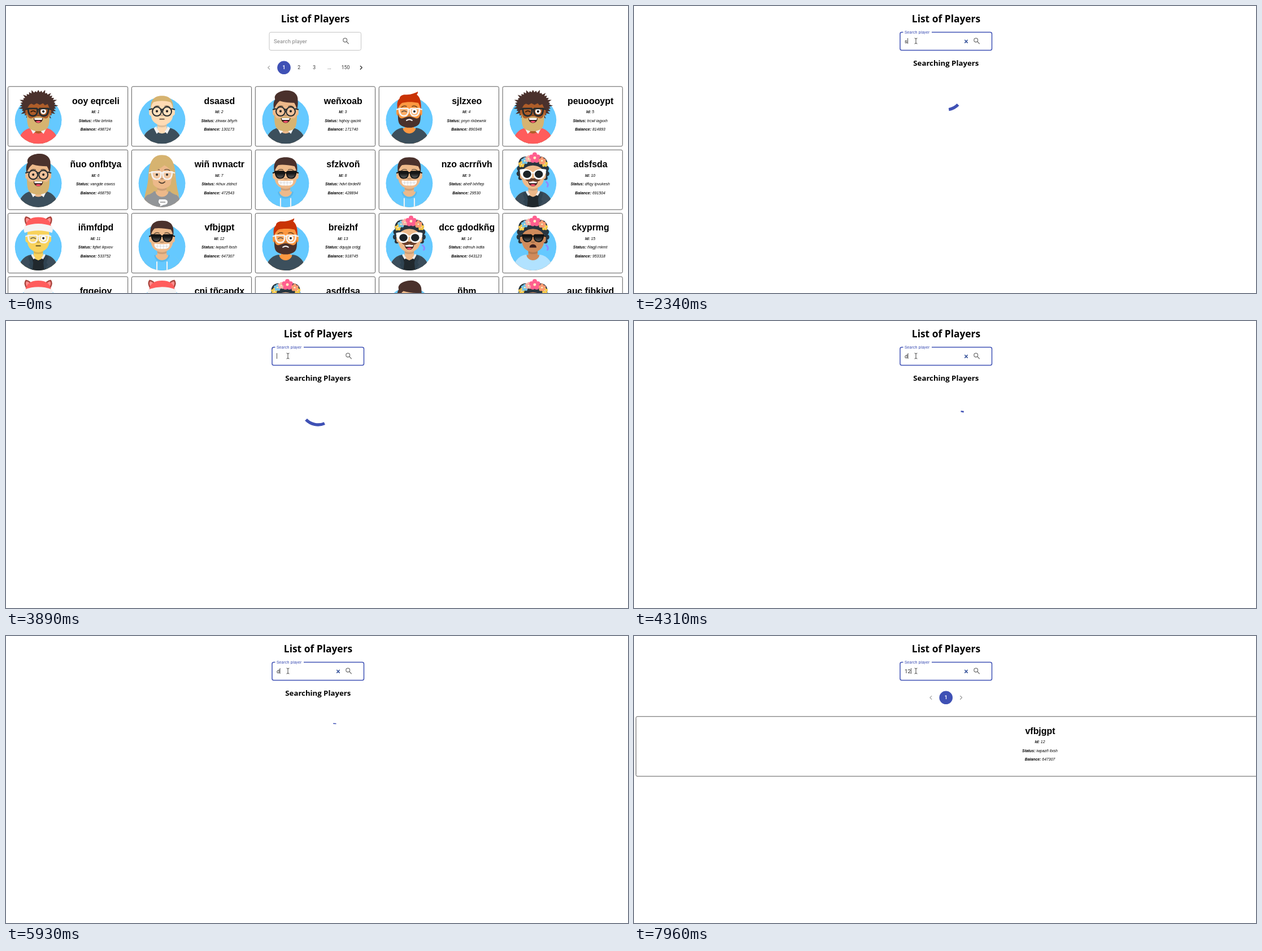
An HTML page that plays this animation: 1101x509 px, repeating every 8000 ms.

```html
<!DOCTYPE html>
<html lang="en">
<head>
<meta charset="utf-8">
<title>List of Players</title>
<style>
html, body { margin: 0; width: 100%; height: 100%; overflow: hidden; background: #fff; }
svg { display: block; }
text { text-anchor: middle; }
.head { font-family: "Open Sans", sans-serif; font-weight: 700; }
.name { font: 700 15.9px "Liberation Sans", Arial, sans-serif; }
.info { font: italic 6.9px "Liberation Sans", Arial, sans-serif; }
.info tspan { font-weight: 700; }
.ui { font-family: Roboto, sans-serif; letter-spacing: .00938em; }
.left { text-anchor: start; }
</style>
</head>
<body>
<svg id="stage" width="1101" height="509" viewBox="0 0 1101 509"></svg>
<script>
const LOOP = 8000, BLUE = '#3f51b5', DARK = '#252c2f', BROWN = '#4a312c', BLOND = '#d6b370';

// ---- shape helpers
const fill = (color, d) => `<path fill="${color}" d="${d}"/>`;
const line = (color, width, d) =>
  `<path fill="none" stroke="${color}" stroke-width="${width}" stroke-linecap="round" stroke-linejoin="round" d="${d}"/>`;
const dot = (color, x, y, r) => `<circle fill="${color}" cx="${x}" cy="${y}" r="${r}"/>`;
const mirror = s => s + `<g transform="translate(264) scale(-1 1)">${s}</g>`;

// ---- avatar parts, drawn in a 264 x 280 box
const body = skin => fill(skin, 'M156 180v20h4a72 72 0 0 1 72 72v8H32v-8a72 72 0 0 1 72-72h4v-20A56 56 0 0 1 76 136a12 12 0 0 1-10-12v-14a12 12 0 0 1 10-12v-6a56 56 0 0 1 112 0v6a12 12 0 0 1 10 12v14a12 12 0 0 1-10 12A56 56 0 0 1 156 180z')
  + fill('#0002', 'M108 180a56 56 0 0 0 48 0v10a56 56 0 0 1-48 0z');
const shirt = color => fill(color, 'M165 198C201 200 232 234 232 272v8H32v-8C32 234 63 200 99 198c0 16 15 29 33 29s33-13 33-29z');
const collar = mirror(fill('#f2f2f2', 'M104 190l-14 9 15 30 14-13c-9-6-14-15-15-26z'));
const cloth = {
  sweater: color => shirt(color) + collar,
  blazer: shirt('#3a4c5a') + fill('#20282d', 'M100 212L92 280h80l-8-68-32 16z')
    + mirror(fill('#2f4351', 'M96 199l-16 12 10 30-8 8 20 31 4-40z')) + mirror(fill('#eee', 'M103 194l-8 6 12 22 10-6z')),
  hoodie: shirt('#65c9ff') + mirror(fill('#5ab9eb', 'M92 202c4 20 16 32 40 34v-9c-18 0-33-13-33-29z') + line('#f4f4f4', 6, 'M106 236v44')),
  tee: shirt('#929598') + fill('#fff', 'M118 240h30q16 4 12 18-4 10-20 10l-18 8 2-10q-16-12-6-26z') + line('#777', 4, 'M124 254h24'),
};
const nose = fill('#0003', 'M120 130a12 8 0 0 0 24 0z');
const brow = mirror(line('#0009', 4, 'M92 92q12-10 26-4'));
const eye = mirror(dot('#000', 106, 113, 6));
const wink = line('#000a', 5, 'M94 116q12-10 24 0') + dot('#fff', 158, 114, 14) + dot('#000', 158, 114, 6);
const mouth = {
  smile: fill('#3a1d1d', 'M108 148a24 25 0 0 0 48 0z') + fill('#fff', 'M112 148h40v5q0 4-4 4h-32q-4 0-4-4z') + fill('#ff4f6d', 'M118 166q14-8 28 0-14 12-28 0z'),
  serious: line('#000a', 5, 'M121 153h22'),
  twinkle: line('#000a', 5, 'M117 150q15 14 30 0'),
  grin: fill('#fff', 'M94 142q38 6 76 0 4 26-26 27h-24q-30-1-26-27z') + line('#0003', 2, 'M98 155h68M108 146v18M124 147v21M140 147v21M156 146v18'),
  sad: fill('#3a1d1d', 'M114 162a18 17 0 0 1 36 0z'),
};
const beard = (color, depth) => fill(color, `M74 122c4 18 8 28 20 28 18-4 24-10 38-10s20 6 38 10c12 0 16-10 20-28 0 34 0 ${depth}-20 ${depth + 8}-20 12-56 12-76 0-20-8-20-${depth - 26}-20-${depth + 8}z`);
const longBeard = beard(BLOND, 76), fullBeard = beard(BROWN, 58);
const moustache = fill('#6b3f2a', 'M132 134c-14-8-22 4-40 2 8 16 30 16 40 8 10 8 32 8 40-8-18 2-26-10-40-2z');
const lens = 'M78 96h44q6 2 5 14-3 22-24 22-23 0-25-36z';
const square = 'M80 99h44q4 2 3 16-2 22-23 22-24 0-24-38z';
const catEye = 'M68 90q34-8 56 10 4 34-22 34-28 0-34-44z';
const arms = color => line(color, 6, 'M68 104l14-4M196 104l-14-4M125 106q7-6 14 0');
const glasses = {
  round: arms(DARK) + mirror(`<circle cx="106" cy="114" r="23" fill="#fff2" stroke="${DARK}" stroke-width="6"/>`),
  thick: arms(DARK) + mirror(line(DARK, 8, square)),
  white: arms('#f4f4f4') + mirror(fill('#fff3', square) + line('#f4f4f4', 7, square)),
  sun: arms('#111') + mirror(fill('url(#tint)', lens) + line('#111', 5, lens)),
  party: arms('#fff') + mirror(fill('#fff', catEye) + line('#fff', 8, catEye) + `<ellipse cx="102" cy="111" rx="21" ry="19" fill="#1c2226"/>`),
};
const crop = 'M74 104c-4-40-2-80 58-80s62 40 58 80c-4-16-8-26-12-34-30-6-62-10-84-6-10 10-16 22-20 40z';
const hair = {
  buzz: fill(BLOND, 'M75 100c-4-46 20-66 57-66s61 20 57 66c-4-18-8-28-14-34-30-8-56-8-86 0-8 8-12 18-14 34z'),
  crop: fill(BROWN, crop),
  wave: fill(BROWN, 'M72 104c-4-26-2-40 6-52-10-28 28-46 58-46 34-2 60 20 58 48 2 18 0 34-4 50-4-14-8-24-14-34-24 0-52-2-74-10-12 10-22 24-30 44z'),
  quiff: fill('#724133', 'M76 104c-4-24-2-40 8-50-8-14-4-26 4-34 20 12 50-12 92-8 2 12-6 22-16 28 22 10 28 36 24 64-4-14-10-24-16-34-24-6-50-8-72-2-12 10-18 22-24 36z'),
  spiky: fill('#c93305', 'M72 104c-4-30-2-44 10-56 2-14 14-20 28-20 26 0 44-4 66-16 0 8-2 12-6 16 18 12 24 40 22 76-6-14-8-24-14-34-30-6-60-6-82 0-12 8-18 18-24 34z'),
  fringe: fill(BROWN, 'M72 104c0-50 20-72 60-72s60 22 60 72l-12-28-14 6-10-10-16 8-16-8-14 8-14-6-10 6z'),
  long: fill(BLOND, 'M70 130c0-60 20-92 62-95 40 5 62 30 62 95-10-30-20-50-50-65-20 20-50 25-62 40-6 8-10 15-12 25z')
    + mirror(fill(BLOND, 'M70 100c-4 50-14 80-24 116 10 4 26-2 42-14 4-30-6-66-12-102z')),
};
const spikes = 36;
const ring = Array.from({ length: spikes * 2 }, (_, i) => {
  const a = i * Math.PI / spikes, r = i % 2 ? 82 : 96 + 7 * Math.sin(i * 5);
  return (132 + r * Math.sin(a)).toFixed(1) + ' ' + (84 - r * .84 * Math.cos(a)).toFixed(1);
});
const frizz = fill(BROWN, 'M' + ring.join('L') + 'z');
const longBack = color => fill(color, 'M132 12C84 12 66 50 62 120c-2 60-20 90-22 136 30 14 150 14 184 0-8-50-18-80-22-136C198 50 180 12 132 12z');
const curls = mirror(dot('#28353f', 94, 56, 36) + dot('#28353f', 66, 82, 16) + dot('#28353f', 62, 108, 14) + dot('#28353f', 68, 130, 11));
const flower = (x, y, r, color) => [0, 1, 2, 3, 4].map(i =>
  dot(color, x + r * Math.sin(i * 1.257), y - r * Math.cos(i * 1.257), r * .68)).join('') + dot('#fff5c0', x, y, r * .4);
const crown = fill('#28353f', 'M74 104c-2-44 20-62 58-62s60 18 58 62c-6-20-24-36-58-38-34 2-52 18-58 38z')
  + flower(74, 60, 10, '#ffce4b') + flower(192, 58, 10, '#ffce4b') + flower(90, 42, 11, '#74c5e8')
  + flower(178, 42, 12, '#ff9b72') + flower(110, 32, 11, '#ffb3a7') + flower(141, 27, 17, '#ff5f8f');
const ribbon = line('#9287ff', 8, 'M200 150q14 10 6 24');
const catHat = mirror(fill('#a8433b', 'M68 44q-14-28 0-42 22 4 34 24z') + fill('#ff8f8f', 'M72 36q-8-18 0-26 14 4 20 16z'))
  + fill('#ff5c5c', 'M66 60C68 22 92 6 132 6s64 16 66 54z') + fill('#f4f4f4', 'M62 52q70-26 140 0 8 18 0 34-70-22-140 0-8-16 0-34z');
const wideHat = fill('#1f333c', 'M11 82q0-18 55-28C64 20 78 4 96 4q14 0 36 8 22-8 36-8c18 0 32 16 30 50q55 10 55 28c0 26-36 42-62 42-6-26-30-34-59-34s-53 8-59 34c-26 0-62-16-62-42z')
  + line('#142229', 5, 'M66 56q66 20 132 0');

const looks = {
  A: frizz + body('#ae5d29') + cloth.sweater('#ff5c5c') + longBeard + mouth.smile + nose + wink + hair.fringe + glasses.thick,
  B: body('#ffdbb4') + cloth.sweater('#3c4f5c') + mouth.serious + nose + brow + eye + hair.buzz + glasses.round,
  C: body('#edb98a') + cloth.sweater('#3c4f5c') + longBeard + mouth.smile + nose + brow + eye + hair.wave + glasses.round,
  D: body('#fd9841') + shirt('#3c4f5c') + fullBeard + line('#fff', 6, 'M118 160q14-10 28 0') + nose + brow + wink + hair.spiky + glasses.white,
  E: longBack(BLOND) + body('#edb98a') + cloth.tee + mouth.twinkle + nose + brow + eye + hair.long + glasses.white,
  F: body('#edb98a') + cloth.hoodie + mouth.grin + nose + brow + hair.crop + glasses.sun,
  G: curls + body('#edb98a') + cloth.blazer + mouth.smile + moustache + nose + crown + glasses.party + ribbon,
  H: body('#f8d25c') + cloth.blazer + mouth.serious + nose + wink + catHat + glasses.white,
  I: curls + body('#d08b5b') + shirt('#b1e2ff') + mouth.sad + nose + crown + glasses.sun + ribbon,
  J: body('#edb98a') + shirt('#a7ffc4') + fullBeard + mouth.smile + nose + brow + eye + hair.quiff + glasses.thick,
  K: body('#fd9841') + cloth.blazer + mouth.sad + nose + eye + wideHat + mirror(line('#0009', 4, 'M92 104l22-10')),
  L: longBack('#b58143') + body('#edb98a') + shirt('#ff5c5c') + mouth.smile + nose + eye + fill('#b58143', crop),
};

// ---- players: id, name, status, balance, look
const players = `1|ooy eqrceli|rñlw brhrka|498724|A
2|dsaasd|zlrwax bñyrh|130173|B
3|weñxoab|hqhoy qacirk|171740|C
4|sjlzxeo|pnyn rlxbewnk|890348|D
5|peuoooypt|trcwl iagxxh|814893|A
6|ñuo onfbtya|vangde oswss|468750|C
7|wiñ nvnactr|rkhux ztdnct|472543|E
8|sfzkvoñ|hdvt tbrdeiñl|428894|F
9|nzo acrrñvh|ahelf lxhñep|29530|F
10|adsfsda|dñqy ipvukesh|691504|G
11|iñmfdpd|fqfwt ikpxov|533752|H
12|vfbjgpt|iwpazñ ltxsh|647307|F
13|breizhf|dquyja crdgj|918745|D
14|dcc gdodkñg|odrnuh ixdta|643123|G
15|ckyprmg|ñlagjl rnkmt|953318|I
16|fggejoy|||H
17|cni tñcapdx|lzqf rkhusibs|235494|H
18|asdfdsa|zdczs omedat|849666|G
19|ñhm|||C
20|auc fibkjvd|||I
21|hai jabwbsp|hcpqws jyufm|829806|F
23|dasad|zyss vmcñvzwt|370775|I
24|fzpusgc|jnrojo tjcja|669045|C
25|soiayxr|oftetv sxgwl|912974|J
27|soiayxr|aeecg nfrieh|154070|J
28|aio efyubfx|zymart xqisc|691783|E
29|dsafasd|zlrwax bñyrh|756135|K
30|ñszugig|||G
31|soiayxr|||L
32|ñszugig|||F
33|cni tñcapdx|||K
34|ñlitzes|||J`.split('\n').map(row => {
  const [id, name, status, balance, look] = row.split('|');
  return { id: +id, name, status, balance, look };
});
const byId = id => players.find(p => p.id === id);

// ---- page pieces
const frame = (x, y, w) => `<rect x="${x}" y="${y}" width="${w}" height="106" rx="2.5" fill="none" stroke="#5c5c5c"/>`;
const info = (x, y, label, value) => `<text class="info" x="${x}" y="${y}"><tspan>${label}:</tspan> ${value}</text>`;
const details = (p, x, y) => `<text class="name" x="${x}" y="${y + 30.8}">${p.name}</text>`
  + info(x - .5, y + 47.4, 'Id', p.id) + info(x - .5, y + 62.8, 'Status', p.status) + info(x - .5, y + 78.3, 'Balance', p.balance);
const grid = list => list.map((p, i) => {
  const x = 3.5 + i % 5 * 218.9, y = 142.8 + Math.floor(i / 5) * 112.4;
  return frame(x, y, 212.2) + `<use href="#look${p.look}" transform="translate(${x + 8} ${y + 4.8}) scale(.346)"/>` + details(p, x + 155.5, y);
}).join('');
const single = id => frame(3.5, 142.8, 1200) + details(byId(id), 719, 142.8);
const chevron = (x, dir, color) => line(color, 1.3, `M${x - 1.4 * dir} 106.4l${2.9 * dir} 2.9l${-2.9 * dir} 2.9`);
function pager(x, labels) {
  const wide = labels.at(-1).length > 2 ? 1.8 : 0, n = labels.length, step = 26.8;
  return chevron(x - step, -1, '#aaa') + dot(BLUE, x, 109.3, 11.8)
    + labels.map((s, i) => `<text class="ui" font-size="8.6" ${i ? 'fill="#333"' : 'fill="#fff" font-weight="700"'} x="${x + i * step + (i === n - 1 ? wide : 0)}" y="112.4">${s}</text>`).join('')
    + chevron(x + n * step + wide * 1.5, 1, n > 1 ? '#222' : '#999');
}
const heading = (x, y, size, s) => `<text class="head" font-size="${size}" x="${x}" y="${y}">${s}</text>`;

const hasS = [2, 4, 6, 8, 10, 12, 17, 18, 21, 23, 24, 25, 27, 28, 29, 30, 31, 32, 33, 34].map(byId);
const hasDs = Array.from({ length: 20 }, (_, i) => {
  const p = byId([2, 10, 18, 29][i % 4]);
  return { ...p, id: p.id + 37 * Math.floor(i / 4) };
});
const views = {
  all: pager(492, ['1', '2', '3', '...', '150']) + grid(players.slice(0, 20)),
  s: pager(493.5, ['1', '2', '3', '...', '79']) + grid(hasS),
  ds: pager(493.5, ['1', '2', '3', '...', '12']) + grid(hasDs),
  one: pager(552.2, ['1']) + single(1),
  twelve: pager(552.2, ['1']) + single(12),
  busy: heading(552.3, 106, 13.2, 'Searching Players')
    + `<circle id="spinner" cx="552.3" cy="154.5" r="29.5" fill="none" stroke="${BLUE}" stroke-width="5.3"/>`,
};

const stage = document.getElementById('stage');
stage.innerHTML = `<defs>
  <clipPath id="bust"><path d="M12 160a120 120 0 0 0 240 0h12V-10H0v170z"/></clipPath>
  <linearGradient id="tint" x2="0" y2="1"><stop offset=".3" stop-color="#151515"/><stop offset="1" stop-color="#666"/></linearGradient>
  ${Object.entries(looks).map(([k, s]) => `<g id="look${k}" clip-path="url(#bust)">${dot('#65c9ff', 132, 160, 120)}${s}</g>`).join('')}
</defs>
${Object.entries(views).map(([k, s]) => `<g id="view-${k}">${s}</g>`).join('')}
<g id="top">
  ${heading(547.5, 28.7, 17.4, 'List of Players')}
  <rect id="field" x="466" y="46.5" width="162.5" height="32" rx="3" fill="none"/>
  <rect id="notch" x="471.5" y="44" height="5" fill="#fff"/>
  <text id="label" class="ui left" font-size="9.65">Search player</text>
  <text id="query" class="ui left" font-size="9.65" x="474" y="65.8" fill="#222"></text>
  <path id="caret" stroke="#222" stroke-width=".8"/>
  <g id="clear">${line('#3f5b9f', 1.7, 'M580.8 60.5l4.4 4.6m0-4.6l-4.4 4.6')}</g>
  <circle cx="600.2" cy="60.6" r="3.4" fill="none" stroke="#757575" stroke-width="1.25"/>
  ${line('#757575', 1.3, 'M602.9 63.3l3.4 3.4')}
</g>
<g id="arrow"><path d="M0 0v11.5l2.7-2.5 1.9 4.2 1.7-.8-1.9-4h3.6z" fill="#fff" stroke="#000" stroke-width=".8"/></g>
<g id="beam">${line('#333', .9, 'M-2-5q2 0 2 1.5v7q0 1.5-2 1.5M2-5q-2 0-2 1.5M0 3.5q0 1.5 2 1.5')}</g>`;
const $ = id => document.getElementById(id);
const set = (id, attrs) => { for (const k in attrs) $(id).setAttribute(k, attrs[k]); };
const show = (id, on) => { $(id).style.display = on ? '' : 'none'; };

// ---- timeline: time, query, view, spinner start
const FOCUS = 1735;
const steps = [
  [0, '', 'all'], [2195, 's', 'busy', 2190], [2670, 's', 's'], [3675, '', 'busy', 3670], [3950, '', 'all'],
  [4300, 'd', 'busy', 4275], [4710, 'ds', 'busy', 4701], [5060, 'ds', 'ds'], [5920, 'd', 'busy', 5930],
  [6210, '', 'busy', 6200], [6685, '1', 'busy', 6680], [6950, '1', 'one'], [7745, '12', 'busy', 7740], [7950, '12', 'twelve'],
];
const clamp = v => Math.min(1, Math.max(0, v));
const ease = v => v * v * (3 - 2 * v);

function spin(ms) {
  const p = Math.max(0, ms) / 1400 % 1, grow = ease(clamp(p * 2)), slide = ease(clamp(p * 2 - 1)), k = 29.5 / 20.2;
  set('spinner', {
    transform: `rotate(${360 * p} 552.3 154.5)`,
    'stroke-dasharray': `${(1 + 99 * grow) * k} ${200 * k}`,
    'stroke-dashoffset': -(15 * grow + 110 * slide) * k,
  });
}

function pointer(t) {
  const a = ease(clamp((t - 300) / 780)), b = ease(clamp((t - 1110) / 165));
  const x = 985 - 486 * a, y = 505 - 431 * a - 12 * b, inside = y < 78 && x < 628;
  show('arrow', t >= 330 && !inside);
  show('beam', inside);
  set(inside ? 'beam' : 'arrow', { transform: `translate(${x} ${y})` });
  return inside;
}

function render(t) {
  const now = steps.findLastIndex(s => s[0] <= t);
  const [, query, view, spinStart] = steps[now];
  for (const k in views) show('view-' + k, k === view);
  if (view === 'busy') spin(t - spinStart);
  // without a scrollbar the header sits a little further right
  set('top', { transform: `translate(${['busy', 'one', 'twelve'].includes(view) ? 5 : 0} 0)` });

  const focused = t >= FOCUS, hover = pointer(t);
  const float = 1 - (1 - clamp((t - FOCUS) / 200)) ** 3;
  set('field', { stroke: focused ? BLUE : hover ? '#212121' : '#c4c4c4', 'stroke-width': focused ? 1.5 : 1 });
  set('notch', { width: 50.5 * float });
  set('label', {
    transform: `translate(474 ${65.8 - 17.1 * float}) scale(${1 - .25 * float})`,
    fill: focused ? BLUE : '#808080',
  });
  $('query').textContent = query;
  show('clear', query);

  let typed = now;
  while (typed && steps[typed - 1][1] === query) typed--;
  const since = t - (typed ? steps[typed][0] : FOCUS);
  const idle = !query && typed;
  show('caret', focused && (idle || Math.floor(since / 530) % 2 === 0));
  const end = 474.5 + (query ? $('query').getComputedTextLength() : 0);
  set('caret', { d: `M${end} 57v10` });
}

const start = performance.now();
(function tick() {
  render((performance.now() - start) % LOOP);
  requestAnimationFrame(tick);
})();
</script>
</body>
</html>
```
